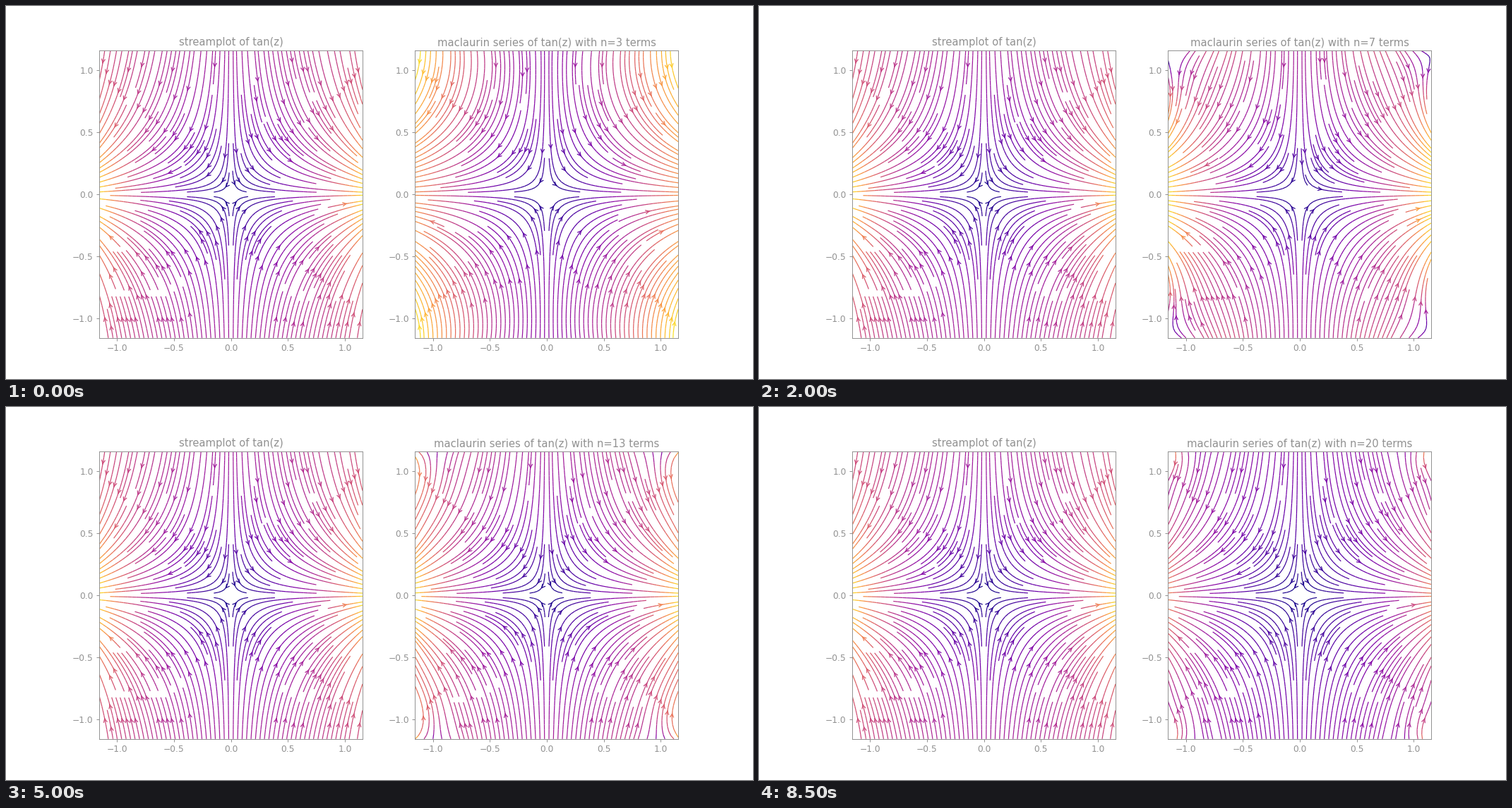
Animation of 1058 by 529 pixels, one loop 9 s. Source, as a matplotlib script:

```python
import numpy as np
import matplotlib.pyplot as plt
from matplotlib.animation import FuncAnimation
from matplotlib.ticker import MultipleLocator

WIDTH, HEIGHT = 1058, 529
FIRST, LAST = 3, 20
LIMIT = 1.155
GRAY = "#919191"

plt.rcParams.update({
    "font.family": "DejaVu Sans",
    "text.color": GRAY,
    "axes.edgecolor": GRAY,
    "axes.titlecolor": GRAY,
    "xtick.color": GRAY,
    "ytick.color": GRAY,
})

axis = np.linspace(-LIMIT, LIMIT, 100)
X, Y = np.meshgrid(axis, axis)
Z = X + 1j * Y


def tan_coefficients(top):
    """Power series of tan(z), from tan' = 1 + tan^2."""
    a = np.zeros(top + 1)
    a[1] = 1
    for k in range(1, top):
        a[k + 1] = np.dot(a[:k + 1], a[k::-1]) / (k + 1)
    return a


def draw_field(ax, w):
    """Stream lines of the conjugate field; returns the new artists."""
    before = len(ax.patches)
    stream = ax.streamplot(axis, axis, w.real, -w.imag, color=np.abs(w),
                           cmap="plasma", linewidth=1, density=2,
                           arrowstyle="->", arrowsize=1)
    return [stream.lines, *list(ax.patches)[before:]]


def odd_power(n):
    return n if n % 2 else n - 1


fig, (left, right) = plt.subplots(1, 2, figsize=(WIDTH / HEIGHT * 6, 6),
                                  dpi=WIDTH / 12)
fig.subplots_adjust(left=0.125, right=0.9, bottom=0.11, top=0.88, wspace=0.2)

draw_field(left, np.tan(Z))
left.set_title("streamplot of tan(z)", fontsize=12)

coeffs = tan_coefficients(LAST)
fields = {}
for power in range(odd_power(FIRST), LAST + 1, 2):
    series = np.polyval(coeffs[power::-1], Z)
    fields[power] = draw_field(right, series)

for ax in (left, right):
    ax.set_xlim(-LIMIT, LIMIT)
    ax.set_ylim(-LIMIT, LIMIT)
    ax.xaxis.set_major_locator(MultipleLocator(0.5))
    ax.yaxis.set_major_locator(MultipleLocator(0.5))
title = right.set_title("", fontsize=12)


def update(i):
    n = FIRST + i
    title.set_text(f"maclaurin series of tan(z) with n={n} terms")
    for power, artists in fields.items():
        for artist in artists:
            artist.set_visible(power == odd_power(n))
    return [title]


anim = FuncAnimation(fig, update, frames=LAST - FIRST + 1,
                     init_func=lambda: update(0), interval=500,
                     repeat=True, repeat_delay=0)
plt.show()
```
